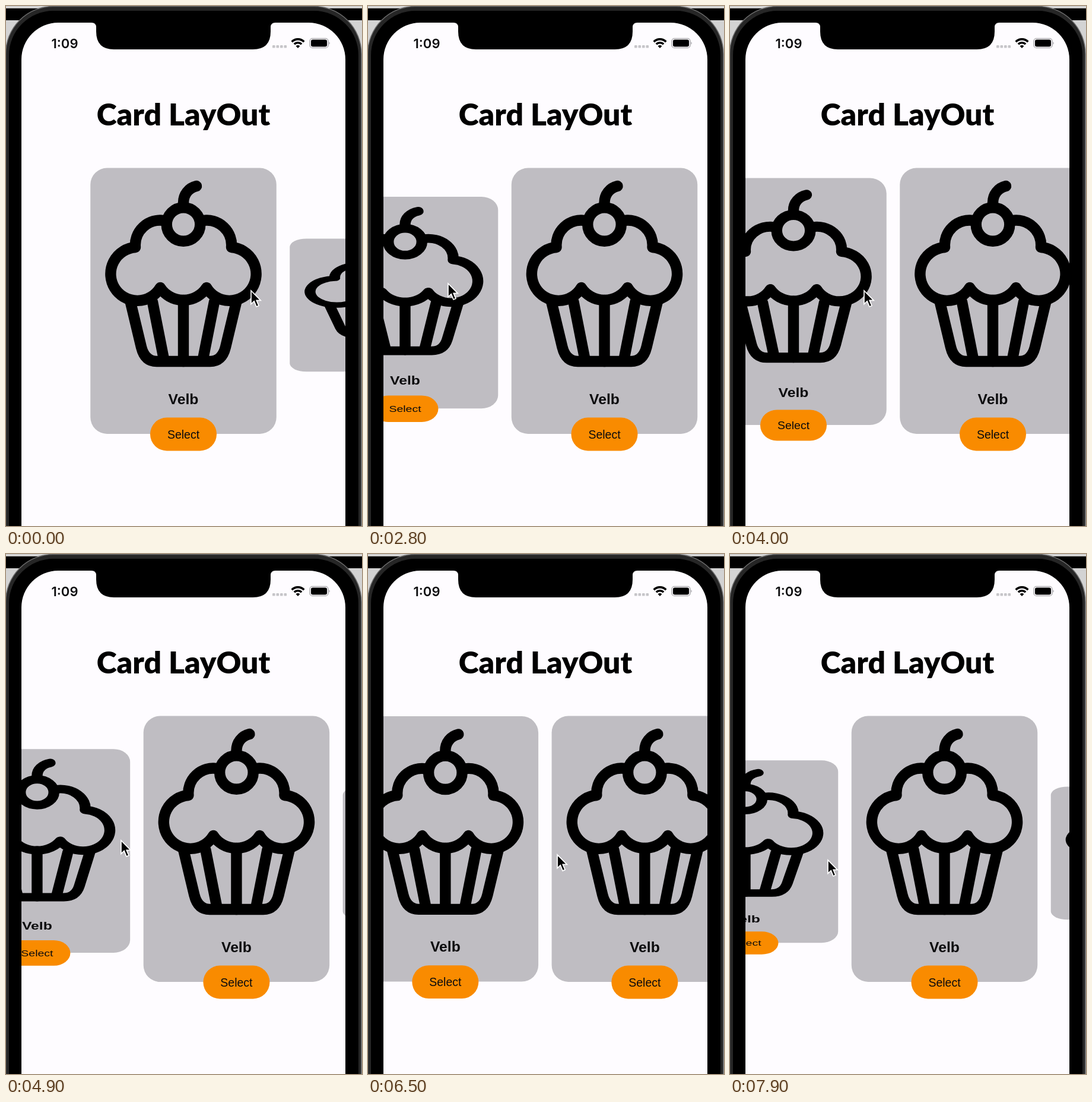
Write an HTML page that moves like this. It is 600 by 875 pixels and loops after 8000 ms.

```html
<!DOCTYPE html>
<html lang="en">
<head>
<meta charset="utf-8">
<title>Card LayOut</title>
<style>
  html, body { margin: 0; width: 100%; height: 100%; overflow: hidden; background: #000; }
  svg { display: block; width: 100%; height: 100%; }
  text { text-anchor: middle; fill: #0b0b0d; }
  .title { font: 900 51.5px Lato, sans-serif; fill: #000; }
  .clock { font: 600 22px Inter, sans-serif; }
  .name { font: bold 24.7px "Liberation Sans", Arial, sans-serif; }
  .button { font: 19.5px "Liberation Sans", Arial, sans-serif; }
  .line { fill: none; stroke: #000; stroke-width: 18.4; stroke-linecap: round; stroke-linejoin: round; }
</style>
</head>
<body>
<svg viewBox="0 0 600 875">
  <defs>
    <clipPath id="screen"><rect x="26" y="28" width="546" height="960" rx="62"/></clipPath>

    <!-- Card and its overhanging button, drawn around their common centre -->
    <g id="card" transform="translate(-299 -510.5)">
      <rect x="142.25" y="272.5" width="313.5" height="447.5" rx="28" fill="#bfbdc2"/>
      <g class="line">
        <path d="M299 331C299 317 308 306 321 303"/>
        <circle cx="299" cy="367.5" r="28.3"/>
        <path d="M266 361A42 42 0 0 0 218 406A45 45 0 1 0 260 474A46.7 46.7 0 0 0 338 474A45 45 0 1 0 380 406A42 42 0 0 0 332 361"/>
        <path d="M210 499L228 574Q234 598 254 598H344Q364 598 370 574L388 499"/>
        <path d="M247 498L266 594M299 495V598M351 498L332 594"/>
      </g>
      <text class="name" x="299" y="669.5">Velb</text>
      <rect x="243" y="692.5" width="112" height="56" rx="28" fill="#f98b00"/>
      <text class="button" x="299" y="727.5">Select</text>
    </g>
  </defs>

  <!-- Desktop and phone body -->
  <rect width="600" height="875" fill="#d3d3d3"/>
  <rect y="4" width="600" height="20" fill="#000"/>
  <rect x="-.5" y=".5" width="599.5" height="990" rx="80" fill="#262626" stroke="#6d6d6d" stroke-width="1.5"/>
  <rect x="5" y="8" width="589" height="980" rx="75" fill="#000"/>
  <rect x="26" y="28" width="546" height="960" rx="62" fill="#fefcff"/>

  <g clip-path="url(#screen)">
    <g id="cards"></g>
    <path d="M144 28Q152 28 152 36V43Q152 73 182 73H416Q446 73 446 43V36Q446 28 454 28Z"/>
  </g>

  <!-- Status bar -->
  <text class="clock" x="99" y="71">1:09</text>
  <g id="signal" fill="#c6c5c9"></g>
  <g fill="none" stroke="#000" stroke-width="3.6">
    <path d="M481.7 60.2A14.5 14.5 0 0 1 502.3 60.2M485.8 64.3A8.8 8.8 0 0 1 498.2 64.3"/>
    <path d="M492 71L488.6 67.4A4.8 4.8 0 0 1 495.4 67.4Z" fill="#000" stroke="none"/>
  </g>
  <rect x="512" y="54.5" width="31" height="16" rx="4.5" fill="none" stroke="#9a999d" stroke-width="1.2"/>
  <rect x="514" y="56.5" width="27" height="12" rx="3"/>
  <path d="M544.5 60Q547 62.5 544.5 65Z" fill="#9a999d"/>

  <text class="title" x="299" y="201">Card LayOut</text>

  <path id="cursor" d="M0 0V22.5L5.2 17.6L9 27L13 25.3L9.2 16.4H16.2Z" stroke="#fff" stroke-width="1.7"/>
</svg>
<script>
const LOOP = 8000, STEP = 100, CENTER_X = 299, CENTER_Y = 510.5, PITCH = 336;

// [time, scroll offset]
const scrollKeys = [[1700, 0], [2800, -236.5], [4000, -192], [5600, -284], [7100, -106], [7900, -273.5]];
// [time, x, y]
const cursorKeys = [[400, 413, 479], [1500, 365, 482], [1700, 365, 482], [2800, 135, 467],
  [4000, 226, 479], [5600, 172, 484], [7100, 399, 518], [7900, 165, 515]];

function svgChild(parent, tag, attributes) {
  const node = document.createElementNS("http://www.w3.org/2000/svg", tag);
  for (const key in attributes) node.setAttribute(key, attributes[key]);
  return document.getElementById(parent).appendChild(node);
}

// Eased interpolation between keys, held before the first and after the last
function sample(keys, time) {
  const next = keys.findIndex(key => key[0] > time);
  if (next === 0) return keys[0].slice(1);
  if (next < 0) return keys[keys.length - 1].slice(1);
  const [a, b] = [keys[next - 1], keys[next]];
  const p = (time - a[0]) / (b[0] - a[0]);
  const eased = p * p * (3 - 2 * p);
  return a.slice(1).map((value, i) => value + (b[i + 1] - value) * eased);
}

for (let i = 0; i < 4; i++) {
  svgChild("signal", "rect", { x: 449 + i * 6.5, y: 66, width: 4.6, height: 4.6, rx: 1.2 });
}
const cards = [0, 1, 2].map(() => svgChild("cards", "use", { href: "#card" }));
const cursor = document.getElementById("cursor");

function draw(now) {
  const time = Math.floor((now % LOOP) / STEP) * STEP;
  const [scroll] = sample(scrollKeys, time);
  cards.forEach((card, i) => {
    const offset = scroll + i * PITCH;
    const scale = Math.min(1, Math.max(0.5, 1.5 - Math.abs(offset) / PITCH));
    card.setAttribute("transform", `translate(${CENTER_X + offset} ${CENTER_Y}) scale(1 ${scale})`);
  });
  cursor.setAttribute("transform", `translate(${sample(cursorKeys, time)})`);
}

const start = performance.now();
function tick() {
  draw(performance.now() - start);
  requestAnimationFrame(tick);
}
tick();
</script>
</body>
</html>
```
